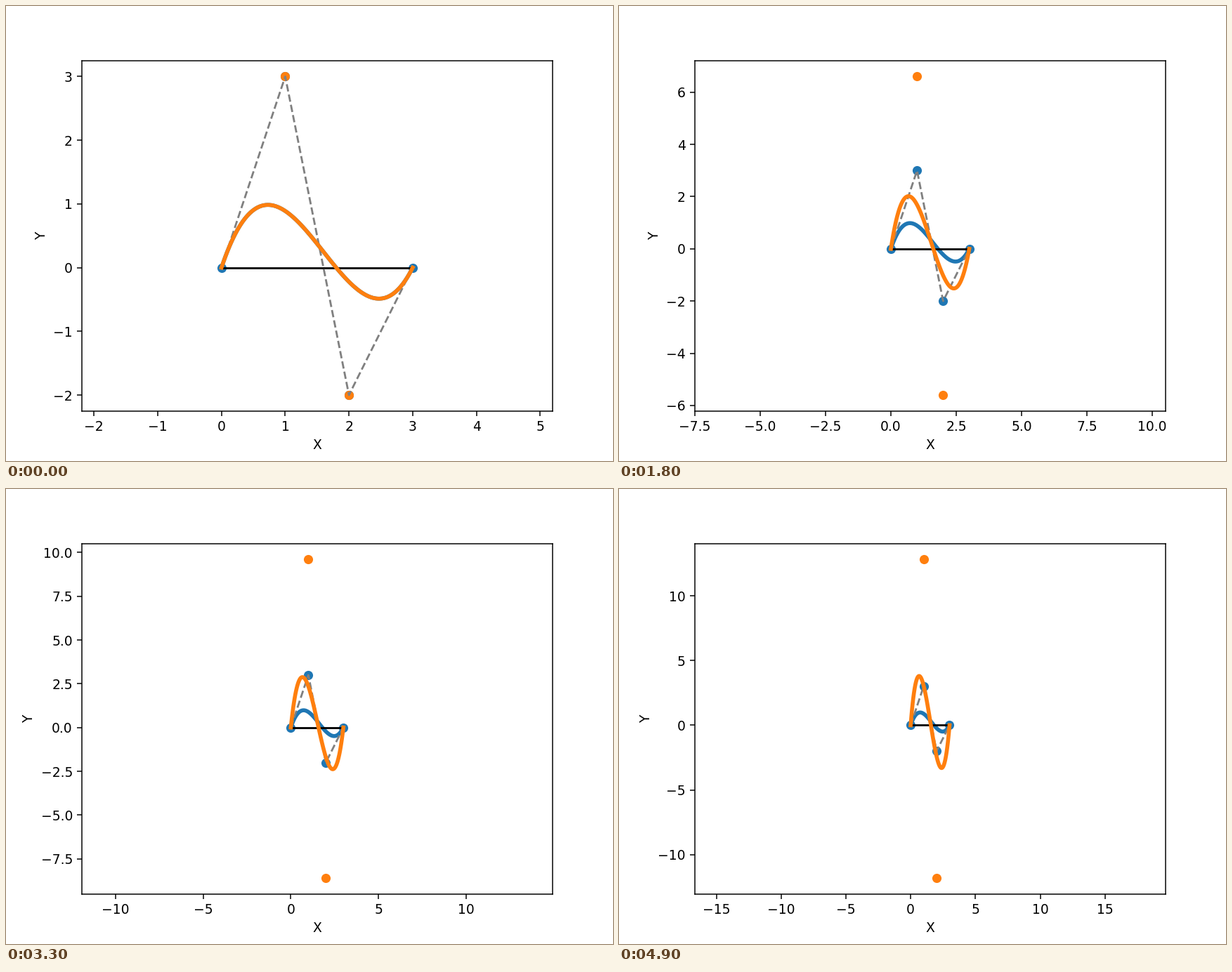
Write a matplotlib script that moves like this. It is 864x648 px and loops after 5000 ms.

```python
import matplotlib.pyplot as plt
import numpy as np
from matplotlib.animation import FuncAnimation

FRAMES, INTERVAL = 50, 100
STEP = 0.2
START, END = (0, 0), (3, 0)
HANDLES = np.array([(1, 3), (2, -2)], dtype=float)

plt.rcParams["font.family"] = "DejaVu Sans"
fig, ax = plt.subplots(figsize=(6.4, 4.8), dpi=135)


def bezier(points, samples=100):
    t = np.linspace(0, 1, samples)[:, None]
    a, b, c, d = points
    return (1 - t)**3 * a + 3 * t * (1 - t)**2 * b + 3 * t**2 * (1 - t) * c + t**3 * d


def polygon(handles):
    return np.vstack([START, handles, END])


def draw(points, *style, **options):
    ax.plot(*np.transpose(points), *style, **options)


def update(frame):
    ax.clear()
    shift = STEP * frame
    moved = HANDLES + [(0, shift), (0, -shift)]
    fixed = polygon(HANDLES)

    draw(bezier(fixed), color="C0", linewidth=3)
    draw(fixed, "o", color="C0")
    draw(moved, "o", color="C1")
    draw([START, END], color="black")
    draw(fixed, "--", color="gray")
    draw(bezier(polygon(moved)), color="C1", linewidth=3)

    ax.axis("equal")
    ax.set_xlabel("X")
    ax.set_ylabel("Y")


animation = FuncAnimation(fig, update, frames=FRAMES, interval=INTERVAL,
                          init_func=lambda: update(0), repeat=True, repeat_delay=0)
plt.show()
```
